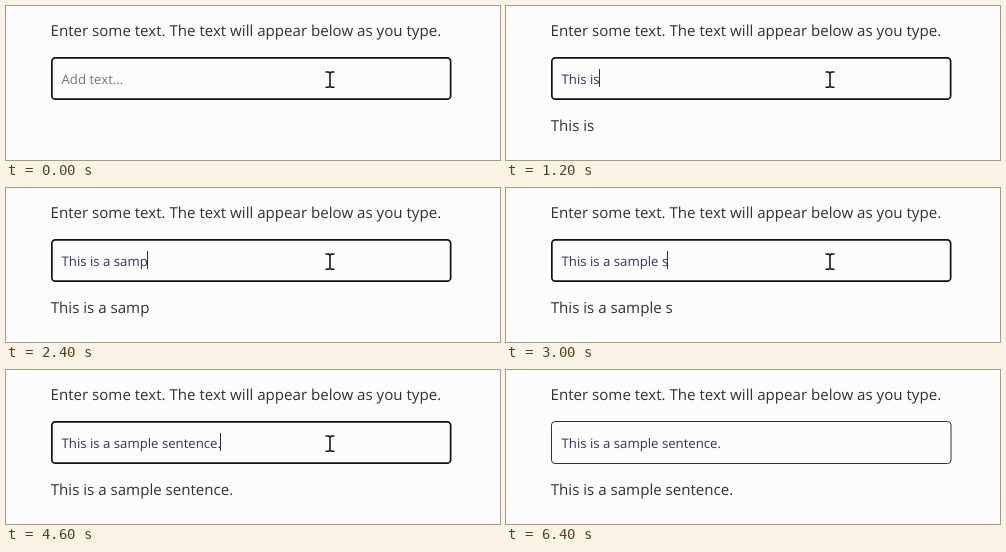
These frames come from a looping animation (494x154 px, 6.5 s). An HTML page with a canvas:

```html
<!DOCTYPE html>
<html lang="en">
<head>
<meta charset="utf-8">
<title>Live text preview</title>
<style>
  html, body { margin: 0; width: 100%; height: 100%; overflow: hidden; background: #fcfcfc; }
  canvas { display: block; width: 494px; height: 154px; }
</style>
</head>
<body>
<canvas id="stage" width="494" height="154"></canvas>
<script>
const canvas = document.getElementById('stage');
const ctx = canvas.getContext('2d');
const W = 494, H = 154, LOOP = 6500, STEP = 100;

const SENTENCE = 'This is a sample sentence.';
// Time in ms at which each character of the sentence is typed.
const KEYS = [200, 400, 500, 700, 900, 1000, 1200, 1400, 1500, 1700, 1900, 2000, 2200,
  2400, 2500, 2700, 2800, 3000, 3200, 3400, 3700, 3800, 4000, 4200, 4400, 4600];
const BLINK_OFF = 5100, BLINK_ON = 5600, POINTER_GONE = 5300, BLUR = 6200;

const BODY_FONT = '15.1px "Open Sans", sans-serif';
const INPUT_FONT = '13.2px "Open Sans", sans-serif';
const INPUT_X = 55.5;

function setup() {
  const ratio = window.devicePixelRatio || 1;
  canvas.width = Math.round(W * ratio);
  canvas.height = Math.round(H * ratio);
  ctx.scale(ratio, ratio);
  ctx.textRendering = 'geometricPrecision';
}

function label(text, x, y, font, color) {
  ctx.font = font;
  ctx.fillStyle = color;
  ctx.fillText(text, x, y);
}

function drawField(t) {
  const blur = Math.min(Math.max((t - BLUR + STEP) / 300, 0), 1);
  const width = 1.7 - 0.7 * blur;
  ctx.lineWidth = width;
  ctx.strokeStyle = blur < 1 ? '#111111' : '#323130';
  ctx.beginPath();
  ctx.roundRect(45 + width / 2, 51 + width / 2, 400.5 - width, 43 - width, 3.5);
  ctx.stroke();
}

function drawPointer() {
  const x = 324;
  ctx.strokeStyle = '#151515';
  ctx.lineWidth = 1.6;
  ctx.beginPath();
  for (const [y, dir] of [[66, 1], [81.3, -1]]) {
    ctx.moveTo(x - 4.5, y);
    ctx.lineTo(x - 1.5, y);
    ctx.lineTo(x, y + dir);
    ctx.lineTo(x + 1.5, y);
    ctx.lineTo(x + 4.5, y);
  }
  ctx.moveTo(x, 67);
  ctx.lineTo(x, 80.3);
  ctx.stroke();
}

function drawCaret(text) {
  ctx.font = INPUT_FONT;
  const x = Math.round(INPUT_X + ctx.measureText(text).width - 0.7);
  ctx.fillStyle = '#303030';
  ctx.fillRect(x, 63, 1, 18);
}

function draw(time) {
  const t = Math.floor((time % LOOP) / STEP) * STEP;
  const typed = SENTENCE.slice(0, KEYS.filter(k => k <= t).length);

  ctx.fillStyle = '#fcfcfc';
  ctx.fillRect(0, 0, W, H);
  label('Enter some text. The text will appear below as you type.', 44.5, 30, BODY_FONT, '#323130');
  drawField(t);

  if (typed) {
    label(typed, INPUT_X, 78, INPUT_FONT, '#37305c');
    label(typed, 44.7, 125, BODY_FONT, '#323130');
  } else {
    label('Add text...', INPUT_X, 78, INPUT_FONT, '#777777');
  }

  const blinkedOff = t >= BLINK_OFF && t < BLINK_ON;
  if (typed && !blinkedOff && t < BLUR) drawCaret(typed);
  if (t < POINTER_GONE) drawPointer();
}

setup();
const start = performance.now();
function tick() {
  draw(performance.now() - start);
  requestAnimationFrame(tick);
}
tick();
</script>
</body>
</html>
```
